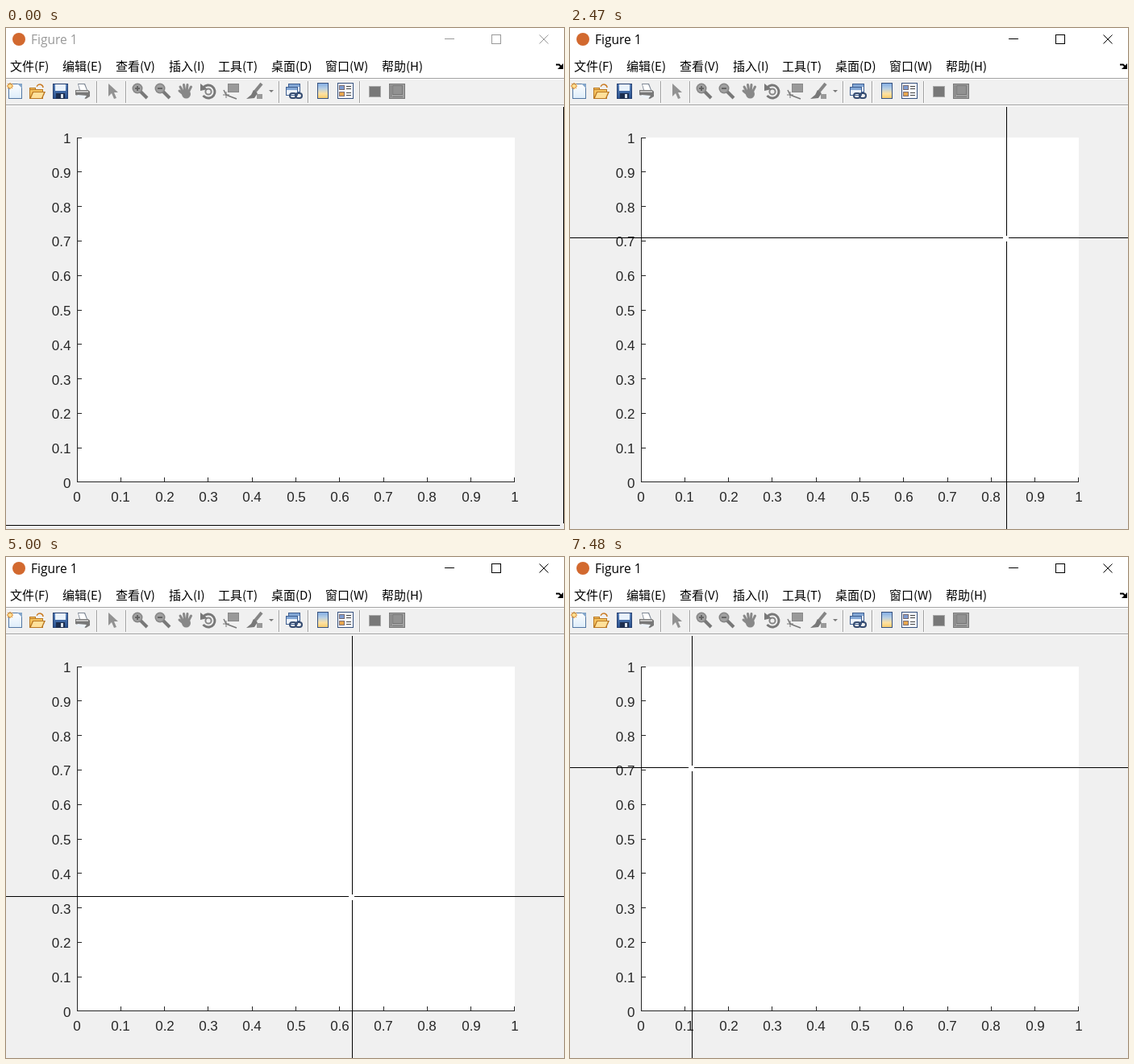
An HTML page with a canvas for the animation above (8 s loop, 692 by 622 pixels).

```html
<!DOCTYPE html>
<html lang="zh">
<head>
<meta charset="utf-8">
<style>
html, body { margin: 0; width: 692px; height: 622px; overflow: hidden; background: #f0f0f0; }
canvas { display: block; }
</style>
</head>
<body>
<canvas id="stage" width="692" height="622"></canvas>
<script>
const W = 692, H = 622, LOOP = 8000, ACTIVE_AT = 1050, STEP = 76;
const GREY = '#929292', DARK = '#787878', BLUE = '#3f5f91', INK = '#262626';
const c = document.getElementById('stage').getContext('2d');

// The pointer sweeps to each spot, slowing down, and rests until the next sweep.
const sweeps = [
  { start: 200, end: 1050, to: [153, 516] },
  { start: 1050, end: 1600, to: [345, 385] },
  { start: 1750, end: 2230, to: [541, 260] },
  { start: 2470, end: 3160, to: [440, 355] },
  { start: 3300, end: 3940, to: [292, 392] },
  { start: 4320, end: 5170, to: [441, 424] },
  { start: 5320, end: 5950, to: [571, 454] },
  { start: 6160, end: 6950, to: [192, 250] },
  { start: 7010, end: 7480, to: [151, 261] }
];

function pointerAt(t) {
  let pos = [691, 617];
  for (const { start, end, to } of sweeps) {
    if (t < start) break;
    const elapsed = Math.floor((t - start) / STEP) * STEP;
    const p = t >= end ? 1 : elapsed / (end - start);
    const eased = 1 - (1 - p) ** 2;
    pos = pos.map((v, i) => v + (to[i] - v) * eased);
  }
  return pos.map(Math.round);
}

function rect(x, y, w, h, fill) {
  c.fillStyle = fill;
  c.fillRect(x, y, w, h);
}

function frame(x, y, w, h, fill, edge) {
  rect(x, y, w, h, edge);
  rect(x + 1, y + 1, w - 2, h - 2, fill);
}

function path(points) {
  c.beginPath();
  for (const [x, y] of points) c.lineTo(x, y);
}

function poly(fill, ...points) {
  path(points);
  c.fillStyle = fill;
  c.fill();
}

function line(color, width, ...points) {
  path(points);
  c.strokeStyle = color;
  c.lineWidth = width;
  c.stroke();
}

function disc(x, y, r, fill) {
  c.beginPath();
  c.arc(x, y, r, 0, Math.PI * 2);
  c.fillStyle = fill;
  c.fill();
}

function arc(x, y, r, color, width, from = 0, to = Math.PI * 2) {
  c.beginPath();
  c.arc(x, y, r, from, to);
  c.strokeStyle = color;
  c.lineWidth = width;
  c.stroke();
}

function shade(h, ...stops) {
  const g = c.createLinearGradient(0, 0, 0, h);
  stops.forEach((s, i) => g.addColorStop(i / (stops.length - 1), s));
  return g;
}

function text(s, x, y, font, color, align = 'left') {
  c.font = font;
  c.fillStyle = color;
  c.textAlign = align;
  c.fillText(s, x, y);
}

function titleBar(active) {
  const ink = active ? '#000' : '#999';
  rect(0, 0, W, 62, '#fff');
  disc(16, 14, 8, '#d2692f');
  text('Figure 1', 31, 20, '15.5px "Open Sans", sans-serif', ink);
  rect(544, 13, 12, 1, ink);
  frame(602, 8, 12, 12, '#fff', ink);
  line(ink, 1, [661.5, 8.5], [672.5, 19.5]);
  line(ink, 1, [672.5, 8.5], [661.5, 19.5]);
}

function menuBar() {
  let x = 5;
  for (const label of '文件(F) 编辑(E) 查看(V) 插入(I) 工具(T) 桌面(D) 窗口(W) 帮助(H)'.split(' ')) {
    text(label, Math.round(x), 53, '15px "Noto Sans CJK SC", "Noto Sans CJK", sans-serif', '#000');
    x += c.measureText(label).width + 16.8;
  }
  line('#000', 2, [682, 45.5], [686, 45.5], [689, 48.5]);
  poly('#000', [691, 44], [691, 51], [684, 51]);
}

// Each icon is drawn in its own box of about 20 by 20 pixels.
function newPage() {
  frame(2, 0, 17, 19, shade(19, '#fff', '#dcecfa'), '#5377a3');
  poly('#83a5ca', [13, 0], [19, 0], [19, 6]);
  for (let a = 0; a < 4; a++) {
    const dx = 4 * Math.cos(a * Math.PI / 4), dy = 4 * Math.sin(a * Math.PI / 4);
    line('#e59431', 1.5, [4 - dx, 3 - dy], [4 + dx, 3 + dy]);
  }
  disc(4, 3, 2, '#ffe596');
}

function folder() {
  frame(0, 5, 8, 4, '#f5c35f', '#b97722');
  frame(0, 7, 17, 12, '#f5c35f', '#b97722');
  poly('#b97722', [4, 10], [20, 10], [16, 19], [0, 19]);
  poly('#ffe09a', [5, 11], [18, 11], [15, 18], [2, 18]);
  arc(13, 5, 4, '#ca7c25', 1.5, Math.PI * 1.1, Math.PI * 2);
}

function disk() {
  frame(1, 0, 19, 19, shade(19, '#5a82bb', '#29528f'), '#243e70');
  rect(4, 1, 13, 8, '#e9f2fc');
  rect(5, 12, 11, 7, '#1c2d4e');
  rect(11, 13, 3, 5, '#dce5ef');
}

function printer() {
  poly('#7e8794', [4, 0], [13, 0], [16, 8], [6, 8]);
  poly('#fff', [5, 1], [12, 1], [15, 8], [7, 8]);
  poly(DARK, [1, 8], [17, 8], [19, 10], [19, 16], [14, 19], [1, 14]);
  rect(2, 9, 15, 2, '#c2c2c2');
  poly('#eef3f8', [4, 14], [15, 15], [12, 19], [1, 16]);
}

function arrow() {
  poly(GREY, [6, 0], [6, 16], [10, 12], [13, 19], [16, 18], [13, 11], [18, 11]);
}

function lens(plus) {
  line(DARK, 4, [10, 10], [18, 18]);
  disc(6, 6, 6.5, '#858585');
  disc(6, 6, 5, '#a0a0a0');
  rect(3, 5, 6, 2, '#656565');
  if (plus) rect(5, 3, 2, 6, '#656565');
}

function hand() {
  c.lineCap = 'round';
  for (let i = 0; i < 4; i++)
    line('#888', 3, [7 + i * 2, 11], [3 + i * 4.5, i % 3 ? 1.5 : 4]);
  line('#888', 3, [8, 14], [2, 9]);
  c.lineCap = 'butt';
  disc(10.5, 13, 5.5, '#888');
}

function rotate() {
  arc(10, 10, 8, DARK, 3, -2.5, 2.5);
  arc(10, 10, 3.6, '#858585', 2);
  poly(DARK, [0, 0], [0, 9], [9, 7]);
}

function dataTip() {
  frame(6, 0, 14, 11, '#999', '#888');
  line(DARK, 1.5, [1, 8], [4, 14], [9, 16], [17, 19]);
  line(DARK, 1, [4, 10], [4, 18]);
  line(DARK, 1, [0, 14], [8, 14]);
}

function brush() {
  line('#858585', 4, [20, 0], [11, 11]);
  poly(DARK, [10, 8], [15, 12], [11, 18], [1, 19], [7, 14]);
  rect(14, 13, 7, 6, '#999');
  poly(DARK, [29, 8], [35, 8], [32, 11]);
}

function linked() {
  for (const [x, y] of [[3, 0], [0, 4]]) {
    frame(x, y, 15, 11, '#eef4fb', BLUE);
    rect(x + 1, y + 1, 13, 3, '#83a7d5');
  }
  for (const x of [5, 12]) {
    c.beginPath();
    c.roundRect(x, 12, 8, 6, 3);
    c.strokeStyle = '#354b70';
    c.lineWidth = 2;
    c.stroke();
  }
}

function colorBar() {
  frame(3, -1, 14, 20, shade(19, '#85afe4', '#b9d0e4', '#ffe1a0', '#f5c966'), '#37527f');
}

function legend() {
  frame(0, -1, 20, 20, '#f8fafd', '#37527f');
  ['#7d9bd0', '#e7a64d'].forEach((fill, i) => {
    frame(2, 2 + i * 8, 7, 6, fill, '#7b6c70');
    for (const y of [3, 6]) rect(11, y + i * 8, 6, 1, '#444');
  });
}

function hidePanels() {
  frame(3, 3, 15, 14, DARK, '#a8a8a8');
}

function showPanels() {
  frame(0, 0, 20, 19, '#a0a0a0', DARK);
  frame(4, 2, 13, 12, GREY, DARK);
  rect(2, 2, 1, 15, DARK);
  rect(4, 16, 13, 1, DARK);
}

const iconGroups = [
  [newPage, folder, disk, printer],
  [arrow],
  [() => lens(true), () => lens(false), hand, rotate, dataTip, brush],
  [linked],
  [colorBar, legend],
  [hidePanels, showPanels]
];

function toolBar() {
  rect(0, 62, W, H - 62, '#f0f0f0');
  for (const y of [62, 95]) {
    rect(0, y, W, 1, '#a0a0a0');
    rect(0, y + 1, W, 1, '#fff');
  }
  let x = 1;
  for (const group of iconGroups) {
    if (x > 1) {
      rect(x - 1, 66, 1, 27, '#a0a0a0');
      rect(x, 66, 1, 27, '#fff');
      x += 8;
    }
    for (const icon of group) {
      c.save();
      c.translate(x, 69);
      icon();
      c.restore();
      x += icon === brush ? 42 : 28;
    }
  }
}

function axes() {
  const font = '17px "Liberation Sans", Arial, sans-serif';
  rect(88, 136, 543, 428, '#fff');
  rect(88, 136, 1, 428, INK);
  rect(88, 563, 543, 1, INK);
  for (let i = 0; i <= 10; i++) {
    const x = 88 + 54.3 * i, y = 136 + 42.8 * (10 - i), label = String(i / 10);
    rect(Math.min(630, Math.floor(x)), 558, 1, 6, INK);
    rect(88, Math.min(563, Math.floor(y)), 6, 1, INK);
    text(label, Math.round(x), 588, font, INK, 'center');
    text(label, 80.5, Math.round(y + 7), font, INK, 'right');
  }
}

function crosshair(x, y) {
  rect(x, 98, 1, y - 100, '#000');
  rect(x, y + 5, 1, H, '#000');
  rect(0, y, x - 4, 1, '#000');
  rect(x + 3, y, W, 1, '#000');
}

const origin = performance.now();
function draw(now) {
  const t = Math.max(0, now - origin) % LOOP;
  titleBar(t >= ACTIVE_AT);
  menuBar();
  toolBar();
  axes();
  crosshair(...pointerAt(t));
  requestAnimationFrame(draw);
}
draw(origin);
</script>
</body>
</html>
```
